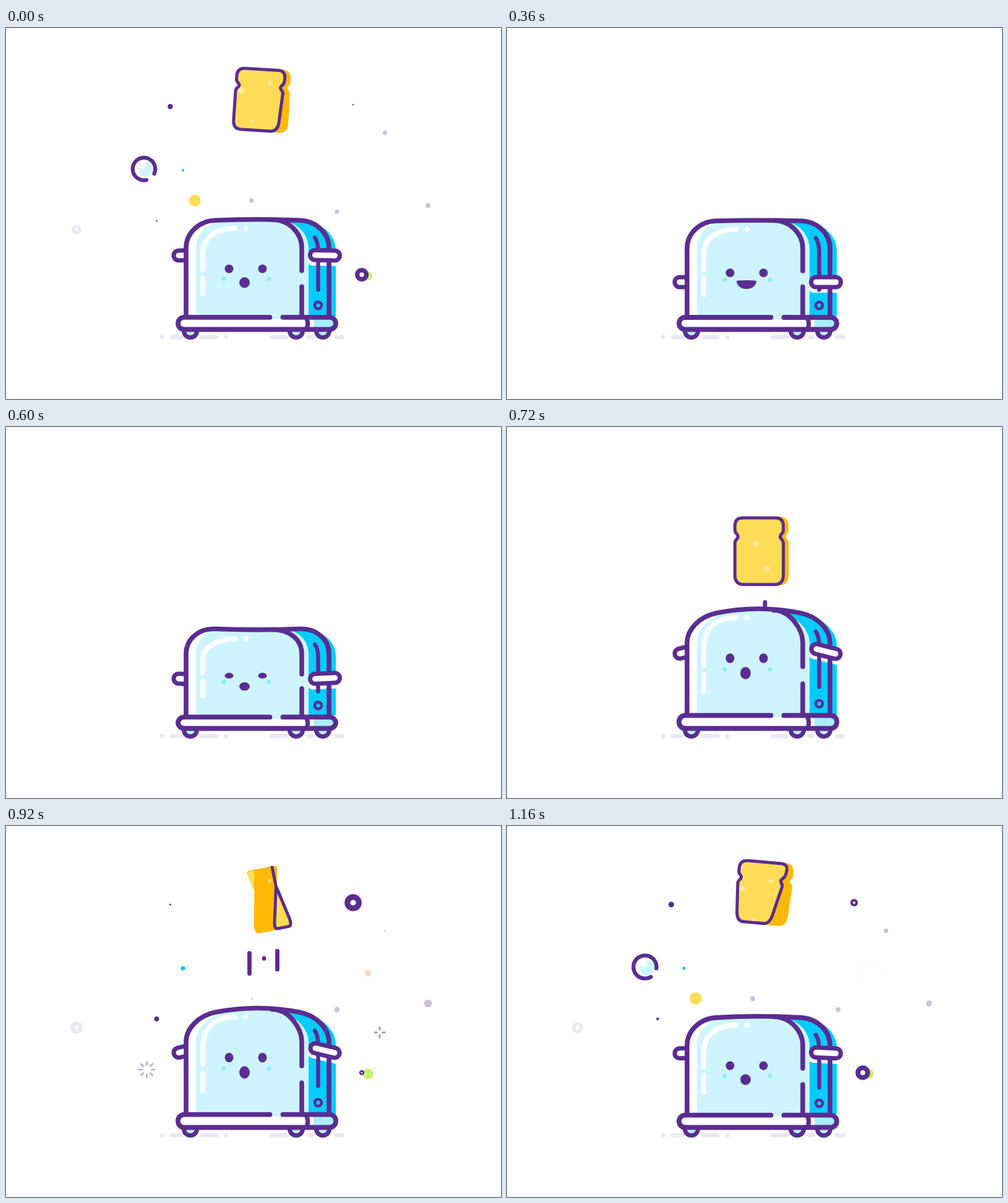
Animation, 800 px wide and 600 px high, one loop 1.2 s. Source, as an HTML page with a canvas:

```html
<!DOCTYPE html>
<html lang="en">
<head>
<meta charset="utf-8">
<title>Toaster</title>
<style>
html, body { margin: 0; width: 100%; height: 100%; overflow: hidden; background: #fff; }
canvas { display: block; }
</style>
</head>
<body>
<canvas width="800" height="600"></canvas>
<script>
const c = document.querySelector('canvas').getContext('2d');
const PURPLE = '#5a2d91', LILAC = '#cdc0e1', MIST = '#ebe8f5', PALE = '#cef5ff',
      BLUE = '#00ccff', YELLOW = '#ffdc58', ORANGE = '#ffb905';
const LOOP = 1200, STEP = 40, START = 560, FLOOR = 466, DEG = Math.PI / 180;
let t; // runs from START to START + LOOP, so that one jump is in one piece

const ramp = (a, b) => Math.min(Math.max((t - a) / (b - a), 0), 1);
const ease = (a, b) => { const s = ramp(a, b); return s * s * (3 - 2 * s); };
const easeOut = (a, b) => { const s = ramp(a, b); return s * (2 - s); };
const mix = (a, b, s) => a + (b - a) * s;

// Quick growth, then a shrink that speeds up
const pop = (size, born, gone) =>
  size * ramp(born, born + 80) * (1 - ramp(born, gone) ** 4);

function fill(color) { c.fillStyle = color; c.fill(); }
function stroke(width, color = PURPLE) { c.lineWidth = width; c.strokeStyle = color; c.stroke(); }

function dot(x, y, r, color, ry = r) {
  c.beginPath();
  c.ellipse(x, y, r, ry, 0, 0, 7);
  fill(color);
}

function ring(x, y, r, width, color) {
  if (r <= 0) return;
  c.beginPath();
  c.arc(x, y, r, 0, 7);
  stroke(width, color);
}

function line(x1, y1, x2, y2, width, color) {
  c.beginPath();
  c.moveTo(x1, y1);
  c.lineTo(x2, y2);
  stroke(width, color);
}

function pill(x, y, angle, left, top, w, h) {
  c.save();
  c.translate(x, y);
  c.rotate(angle * DEG);
  c.beginPath();
  c.roundRect(left, top, w, h, 8);
  c.restore();
  fill('#fff');
}

function ground() {
  for (const [x, w] of [[252, 0], [268, 16], [317, 23], [356, 0], [429, 23], [489, 5], [533, 10]])
    line(x, 500, x + w, 500, 7, MIST);
}

function burst(x, y, n, born, color) {
  const s = ramp(born, born + 300), r = 21 * s * (2 - s), inner = r - Math.min(.4 * r, 9 * (1 - s));
  if (s <= 0 || s >= 1) return;
  c.globalAlpha = 1 - s / 2;
  for (let i = 0; i < n; i++) {
    const a = i * 2 * Math.PI / n, dx = Math.cos(a), dy = Math.sin(a);
    line(x + dx * inner, y + dy * inner, x + dx * r, y + dy * r, 3.5 - 2.5 * s, color);
  }
  c.globalAlpha = 1;
}

function bubble(x, y) {
  const r = pop(19, 960, 1500), core = pop(12.5, 980, 1430), gap = 33 + (t - 1160) * .45;
  if (r <= 0) return;
  dot(x + 3, y + 1, core, PALE);
  dot(x - 2.5, y - 5.5, core / 2, '#fff');
  c.beginPath();
  c.arc(x, y, r, (gap + 26) * DEG, (gap + 334) * DEG);
  stroke(r * .24 + 1.8);
}

function particles() {
  const speck = (x, y, r, color, born = 895, gone = 1390) => dot(x, y, pop(r, born, gone), color);
  const donut = (x, y, size, color, born = 895, gone = 1390) => {
    const r = pop(size, born, gone) * .66;
    ring(x, y, r, r, color);
  };
  speck(265.5, 127, 5, PURPLE);
  speck(612.5, 169.5, 4, LILAC);
  speck(397, 279, 4.4, LILAC);
  speck(535, 297, 4.4, LILAC, 840);
  speck(682, 287, 6.3, LILAC, 840, 1300);
  speck(243.5, 312, 3.9, PURPLE, 840, 1240);
  speck(286, 230, 3.6, BLUE, 840, 1280);
  speck(305, 279, 10.3, YELLOW, 940, 1430);
  speck(585, 401, 8.6, '#c3f46c', 840);
  donut(561, 124, 14, PURPLE, 840, 1210);
  donut(114, 326, 10, MIST, 840);
  donut(575, 399, 13, PURPLE);
  bubble(223, 228);
  burst(227.5, 394, 8, 806, '#a791c8');
  burst(604, 334, 4, 857, '#9a82c0');
  burst(585, 238, 8, 890, '#f6d5c8');
}

// A dash whose tail follows its head from one height to another
function trail(x, born, from, to) {
  if (t < born || t > born + 240) return;
  line(x, mix(from, to, easeOut(born, born + 200)), x, mix(from, to, easeOut(born + 60, born + 240)), 6.8);
}

function trails() {
  trail(417, 690, 310, 214);
  trail(438.5, 788, 310, 188);
  trail(393.5, 796, 310, 188);
  trail(417, 1205, 150, 218.5);
  trail(383.5, 1280, 117, 156);
}

// The slice spins around its upright axis, the lower end lagging behind
function bread() {
  const APEX = 1080, D = 17;
  const swing = ramp(720, 1320);
  const lean = -19 * DEG * Math.sin(2 * Math.PI * swing) * (1 - swing);
  const cx = 411 + 21 * Math.sin(Math.PI * swing) * (1 - swing);
  const rise = 190 * ((APEX - t) / 480) ** 2.34 + 170 * (1 - ramp(560, 690)) ** 1.5;
  const cy = Math.min(405, 104 + (t < APEX ? rise : 195 * ((t - APEX) / 320) ** 2.8));
  const high = mix(54, 49.5, ease(700, 880));
  const top = -12 + 360 * ease(778, 1160), low = -12 + 360 * ease(772, 1257);
  const sin = Math.sin(lean), cos = Math.cos(lean);

  function slice(z, width, shift = 0) {
    const at = (u, v) => {
      const a = DEG * mix(top, low, (v + 1) / 2);
      const x = u * 40 * width(Math.cos(a)) + z * Math.sin(a), y = v * high;
      return [cx + shift + x * cos - y * sin, cy + x * sin + y * cos];
    };
    const L = (u, v) => c.lineTo(...at(u, v));
    const Q = (a, b, u, v) => c.quadraticCurveTo(...at(a, b), ...at(u, v));
    c.beginPath();
    L(.68, -1); Q(1, -1, 1, -.75); L(1, -.66);
    Q(1, -.56, .91, -.51); Q(.83, -.44, .91, -.37); Q(1, -.32, 1, -.24);
    L(1, .72); Q(1, 1, .62, 1); L(-.62, 1); Q(-1, 1, -1, .72); L(-1, -.24);
    Q(-1, -.32, -.91, -.37); Q(-.83, -.44, -.91, -.51); Q(-1, -.56, -1, -.66);
    L(-1, -.75); Q(-1, -1, -.68, -1);
    c.closePath();
  }

  const away = Math.cos(DEG * (top + low) / 2) < 0;
  const toward = w => Math.max(w, 0), behind = w => Math.max(-w, 0);
  const crust = () => {
    for (let z = -D; z <= D; z += 2) { slice(z, Math.abs); fill(ORANGE); stroke(3, ORANGE); }
  };
  const front = () => {
    slice(D, toward, -2.5); fill(YELLOW);
    slice(D, toward); stroke(5);
  };
  const back = () => {
    slice(-D, behind, -2.5); fill(YELLOW);
    if (away) stroke(5);
  };
  (away ? [front, crust, back] : [crust, back, front]).forEach(draw => draw());

  const crumb = (x, y, r) => dot(x, y, r, 'rgba(255,255,255,.38)');
  if (t < 800) {
    crumb(402, 189, 5);
    crumb(420.5, 229, 4.5);
  } else {
    crumb(426.5, 89, 3.5);
    crumb(380, 101, 5);
    crumb(398, 151, 3);
  }
}

function toaster() {
  const hop = ease(610, 690) * (1 - ease(880, 1270));
  const squash = 1 - ease(560, 650) + ease(1590, 1730);
  const press = 1 - ease(580, 680) + ease(1360, 1520);

  const T = 311 - 17 * hop + 29 * squash, bend = 1 + 6 * hop - 4 * squash, S = T + bend;
  const scale = (FLOOR - S) / 156, up = d => FLOOR - d * scale, bendY = up(111);
  const leverY = 368 - 5 * hop + 43 * press, tilt = 14 * hop - 5 * squash;
  const baseY = 468 - 1.5 * hop + 2 * squash;
  const kneeY = S + .8 * bend, sideY = kneeY + 20 * scale;

  const rightCorner = (x, drop = 0) =>
    c.bezierCurveTo(x - 20, kneeY + drop, x, sideY + drop, x, bendY + drop);
  function arch(x0, x1) {
    c.beginPath();
    c.moveTo(x0, FLOOR);
    c.lineTo(x0, bendY);
    c.bezierCurveTo(x0, sideY, x0 + 20, kneeY, x0 + 47, S);
    c.quadraticCurveTo((x0 + x1) / 2, 2 * T - S, x1 - 47, S);
    rightCorner(x1);
    c.lineTo(x1, FLOOR);
  }

  // left handle
  pill(282, leverY + Math.abs(tilt) * .2, -tilt, -11, -8, 40, 16);
  stroke(7);

  // body
  arch(291, 522);
  fill('#fff');
  c.beginPath();
  c.moveTo(448, T + 3);
  c.lineTo(486, S + 3);
  rightCorner(533, 4);
  c.lineTo(533, FLOOR);
  c.lineTo(448, FLOOR);
  fill(BLUE);
  arch(307, 489);
  fill(PALE);
  pill(515.5, leverY + 8, tilt, -28, -9, 58, 18);
  arch(291, 522);
  stroke(7.6);
  c.beginPath();
  c.moveTo(430, T + bend * .3);
  c.bezierCurveTo(458, T + bend * .3, 478, sideY, 478, bendY);
  c.lineTo(478, up(72) - 2);
  stroke(7.6);
  line(478, up(48), 478, FLOOR, 7.6);

  // shine
  const shine = T + 14.5;
  c.beginPath();
  c.moveTo(318, up(76));
  c.lineTo(318, up(102));
  c.bezierCurveTo(318, shine + 16, 338, shine, 370, shine);
  stroke(8, '#fff');
  dot(388, shine, 4.2, '#fff');
  line(318, up(62), 318, up(36), 8, '#fff');

  // lever track and knob
  c.beginPath();
  c.moveTo(499, up(128));
  c.quadraticCurveTo(504.5, up(121), 504.5, up(104));
  c.lineTo(504.5, up(43));
  stroke(6.5);
  ring(504.5, up(17.5), 5.5, 4.6);

  face(hop, squash, press);
  base(baseY);

  pill(515.5, leverY, tilt, -24, -8, 48, 16);
  stroke(7);
}

function face(hop, squash, press) {
  const smile = ease(1220, 1360) - ease(1590, 1700);
  const eyeY = 391 - 17 * hop + 11.5 * squash + 5 * press;
  const cheekY = 407 - 15 * hop + 9.5 * squash;
  const mouthY = 413 - 15 * hop + 3.5 * squash + 5 * press - 8.5 * smile;
  const round = 7.5 + 1.5 * hop - 3 * squash;

  for (const x of [360.5, 414.5]) dot(x, eyeY, 7, PURPLE, 7 + .7 * hop - 4 * squash);
  for (const x of [352, 425]) dot(x, cheekY, 3.4, '#8decff');

  const x = mix(385.5, 387, smile), w = mix(7.5, 15, smile);
  c.beginPath();
  c.ellipse(x, mouthY, w, mix(round, .4, smile), 0, Math.PI, 2 * Math.PI);
  c.ellipse(x, mouthY, w, mix(round, 11.5, smile), 0, 0, Math.PI);
  c.closePath();
  fill(PURPLE);
  stroke(2);
}

function base(y) {
  const bottom = 487.5, left = 278, right = 533, r = 9.8;
  for (const x of [298, 469, 512]) {
    dot(x, 490, 10, '#bdf1ff');
    ring(x, 490, 10.5, 7);
  }
  c.beginPath();
  c.roundRect(left, y, right - left, bottom - y, r);
  fill('#fff');
  c.fillStyle = '#a9eeff';
  c.fillRect(497, y + 3, 33, 14);
  c.fillStyle = PALE;
  c.fillRect(428, y - 4, 20, 7);
  c.beginPath();
  c.moveTo(447.5, y);
  c.arcTo(right, y, right, 478, r);
  c.arcTo(right, bottom, 500, bottom, r);
  c.arcTo(left, bottom, left, 478, r);
  c.arcTo(left, y, 300, y, r);
  c.lineTo(426.5, y);
  stroke(7.8);
  c.beginPath();
  c.moveTo(486, y + 3);
  c.quadraticCurveTo(489.5, 478, 486, 486);
  stroke(7);
}

function frame(now) {
  t = Math.floor(now % LOOP / STEP) * STEP;
  if (t < START) t += LOOP;
  c.clearRect(0, 0, 800, 600);
  c.lineCap = c.lineJoin = 'round';
  ground();
  particles();
  trails();
  bread();
  toaster();
  requestAnimationFrame(frame);
}
requestAnimationFrame(frame);
</script>
</body>
</html>
```
